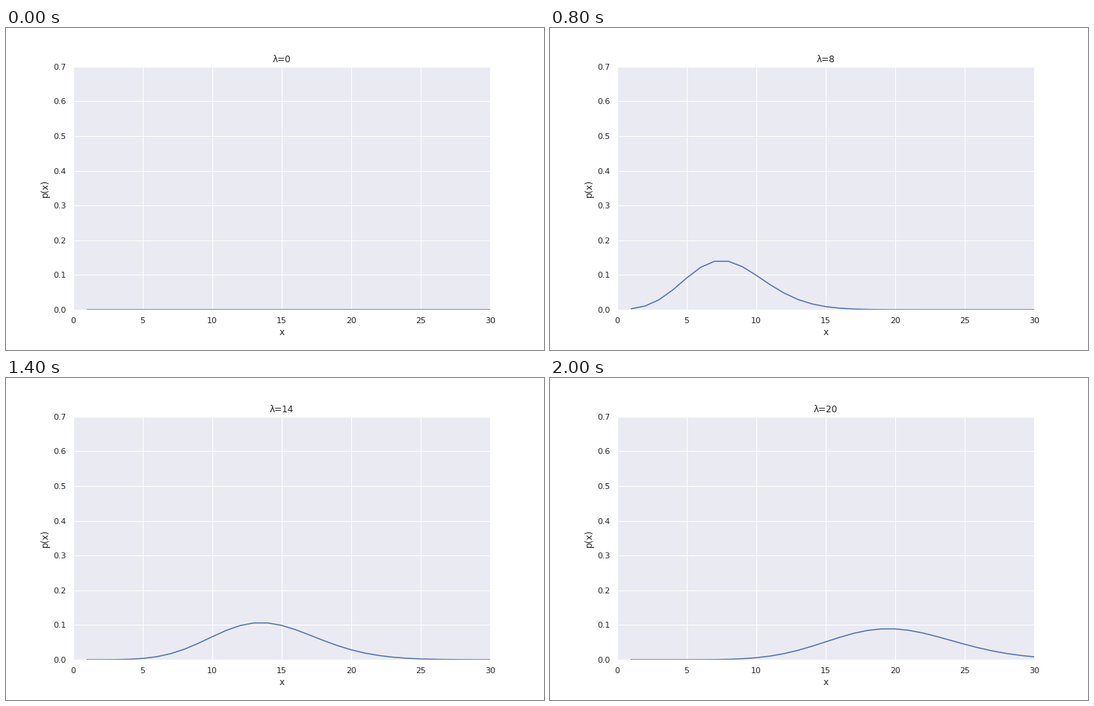
Animation of 720x432 px, one loop 2100 ms. Source, as a matplotlib script:

```python
import math

import matplotlib.pyplot as plt
import numpy as np
from matplotlib.animation import FuncAnimation

INK = "#262626"
BLUE = "#4c72b0"
GREY = "#808080"
FLAT = 2.5e-4  # below this the curve reads as a grey baseline

plt.rcParams.update({
    "font.family": "DejaVu Sans",
    "text.color": INK,
    "axes.labelcolor": INK,
    "axes.facecolor": "#eaeaf2",
    "axes.edgecolor": "white",
    "axes.linewidth": 1.25,
    "axes.axisbelow": True,
    "axes.titlesize": 12,
    "axes.labelsize": 12,
    "lines.solid_capstyle": "round",
})

x = np.arange(1, 31)
factorials = np.array([float(math.factorial(k)) for k in x])


def poisson(lam):
    return math.exp(-lam) * float(lam) ** x / factorials


fig, ax = plt.subplots(figsize=(10, 6), dpi=72)
fig.subplots_adjust(left=0.125, right=0.9, bottom=0.125, top=0.88)
ax.set(xlim=(0, 30), ylim=(0, 0.7), xlabel="x", ylabel="p(x)")
ax.grid(color="white", linewidth=1)
ax.tick_params(length=6, pad=3.5, left=False, bottom=False,
               labelsize=11, labelcolor=INK)

curve, = ax.plot([], [], color=BLUE, linewidth=1.5)
baseline, = ax.plot([], [], color=GREY, linewidth=1.5)
title = ax.set_title("")


def update(lam):
    p = poisson(lam)
    curve.set_data(x, p)
    baseline.set_data(x, np.where(p < FLAT, p, np.nan))
    title.set_text(f"λ={lam}")
    return curve, baseline, title


anim = FuncAnimation(fig, update, frames=21, interval=100,
                     repeat=True, repeat_delay=0)
plt.show()
```
